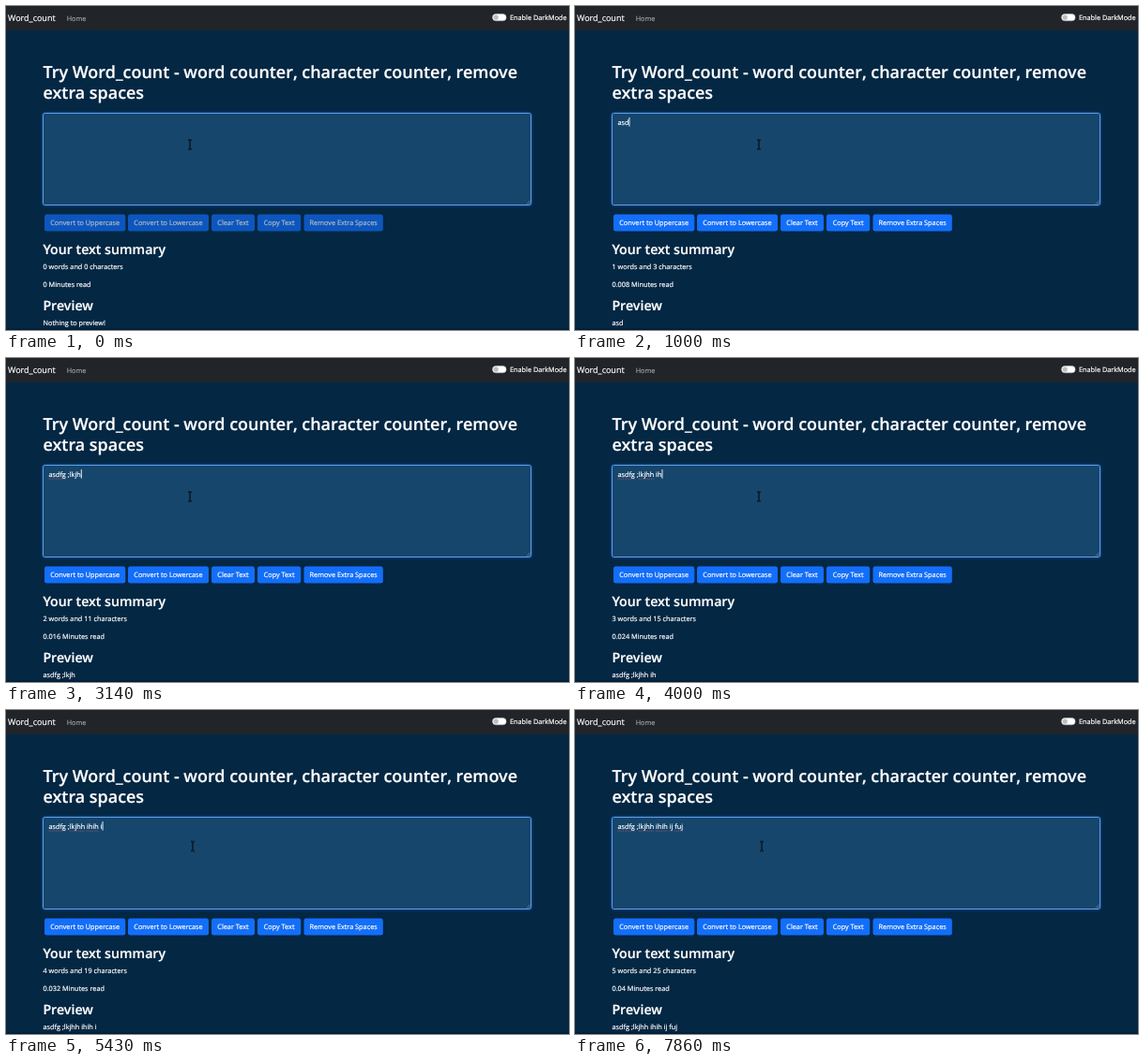
Recreate the animation shown at these times as an HTML page. Size 600 by 346 pixels, loop 8 s.

```html
<!DOCTYPE html>
<html lang="en">
<head>
<meta charset="utf-8">
<title>Word counter</title>
<style>
  html, body { margin: 0; width: 100%; height: 100%; overflow: hidden; background: #042743; }
  svg { display: block; width: 600px; height: 346px; }
  text {
    font: 400 7.3px "Open Sans", "Noto Sans", sans-serif;
    fill: #fff;
    stroke: #fff;
    stroke-width: .2px;
    white-space: pre;
    text-rendering: geometricPrecision;
  }
  .brand { font-size: 9px; }
  .link { fill: #9b9ea0; stroke: #9b9ea0; }
  .title { font-size: 17.95px; font-weight: 600; }
  .subtitle { font-size: 14.2px; font-weight: 600; }
  .button rect { fill: #136ef9; }
  .button text { text-anchor: middle; }
  .disabled { opacity: .68; }
  #pointer { animation: drift 8s step-end infinite; }
  @keyframes drift {
    0% { transform: translate(196px, 148px); }
    57.125% { transform: translate(197px, 147px); }
    60.75% { transform: translate(199px, 145.5px); }
  }
</style>
</head>
<body>
<svg viewBox="0 0 600 346">
  <rect width="600" height="346" fill="#042743"/>
  <rect y="344.5" width="600" height="1.5" fill="#031c33"/>

  <rect width="600" height="26" fill="#212529"/>
  <text class="brand" x="2" y="16">Word_count</text>
  <text class="link" x="64.7" y="15.7">Home</text>
  <rect x="518.5" y="8.6" width="14.6" height="7.2" rx="3.6" fill="#fff" stroke="#bfbfbf" stroke-width=".5"/>
  <circle cx="522.2" cy="12.2" r="2.6" fill="#bfbfbf"/>
  <text x="537" y="15.4">Enable DarkMode</text>

  <text class="title" x="39.5" y="76.6">Try Word_count - word counter, character counter, remove</text>
  <text class="title" x="39.5" y="99.3">extra spaces</text>

  <rect x="38.8" y="113.8" width="521.4" height="99.4" rx="3" fill="none" stroke="#0d6efd" stroke-opacity=".25" stroke-width="2.6"/>
  <rect x="39.5" y="114.5" width="520" height="98" rx="2.2" fill="#16466c" stroke="#659fe4"/>
  <path d="M554.8 211.6l4-4M557 211.6l1.8-1.8" stroke="#8c9aa6" stroke-width=".6"/>
  <path id="squiggles" fill="none" stroke="#cf5a6c" stroke-width=".8" stroke-dasharray="1 .9" opacity=".8"/>
  <text id="typed" x="45.4" y="126.6"></text>
  <rect id="caret" y="119" width=".9" height="9.6" fill="#fff"/>
  <path id="pointer" d="M-2 -5h1.3l.7.6.7-.6H2M0 -4.4V4.4M-2 5h1.3l.7-.6.7.6H2" fill="none" stroke="#000"/>

  <g id="buttons"></g>

  <text class="subtitle" x="39.4" y="265.4">Your text summary</text>
  <text id="counts" x="39.5" y="281"></text>
  <text id="minutes" x="39.5" y="299.8"></text>
  <text class="subtitle" x="39.4" y="325.4">Preview</text>
  <text id="preview" x="39.5" y="341.2"></text>
</svg>
<script>
  const LOOP = 8000;
  const MESSAGE = "asdfg ;lkjhh ihih ij fuj ";
  const KEY_TIMES = [
    140, 570, 860, 1430, 1710, 1860, 2290,
    2430, 2710, 2860, 3140, 3290, 3430, 3710, 4000,
    4290, 4570, 4860, 5430, 5570, 6140, 6570, 6710, 6860, 7000
  ];
  const $ = id => document.getElementById(id);
  const [typed, caret, squiggles, buttons, counts, minutes, preview] =
    ["typed", "caret", "squiggles", "buttons", "counts", "minutes", "preview"].map($);

  buttons.innerHTML = [
    ["Convert to Uppercase", 41, 86.3],
    ["Convert to Lowercase", 130, 86],
    ["Clear Text", 219, 46],
    ["Copy Text", 268, 46.2],
    ["Remove Extra Spaces", 317.5, 84.3]
  ].map(([label, x, width]) => `<g class="button">
    <rect x="${x}" y="222.6" width="${width}" height="18" rx="2.4"/>
    <text x="${x + width / 2}" y="234.4">${label}</text></g>`).join("");

  // Marks every finished word as misspelt.
  function underline(text) {
    return [...text.matchAll(/[a-z]+(?= )/g)].map(({ 0: word, index }) => {
      const from = typed.getStartPositionOfChar(index).x;
      const to = typed.getEndPositionOfChar(index + word.length - 1).x;
      return `M${from} 129.2H${to}`;
    }).join("");
  }

  function showText(length) {
    const text = MESSAGE.slice(0, length);
    const words = text.split(" ").filter(Boolean).length;
    typed.textContent = text;
    squiggles.setAttribute("d", underline(text));
    caret.setAttribute("x", 45.5 + (length ? typed.getComputedTextLength() : 0));
    buttons.setAttribute("class", length ? "" : "disabled");
    counts.textContent = `${words} words and ${length} characters`;
    minutes.textContent = `${+(words * 0.008).toFixed(3)} Minutes read`;
    preview.textContent = text || "Nothing to preview!";
  }

  let shown = -1;
  function draw() {
    const time = performance.now() % LOOP;
    const length = KEY_TIMES.filter(key => key <= time).length;
    if (length !== shown) showText(shown = length);
    const idle = length ? time - KEY_TIMES[length - 1] : 500;
    caret.style.visibility = idle % 1000 < 500 ? "visible" : "hidden";
    requestAnimationFrame(draw);
  }
  draw();
</script>
</body>
</html>
```
